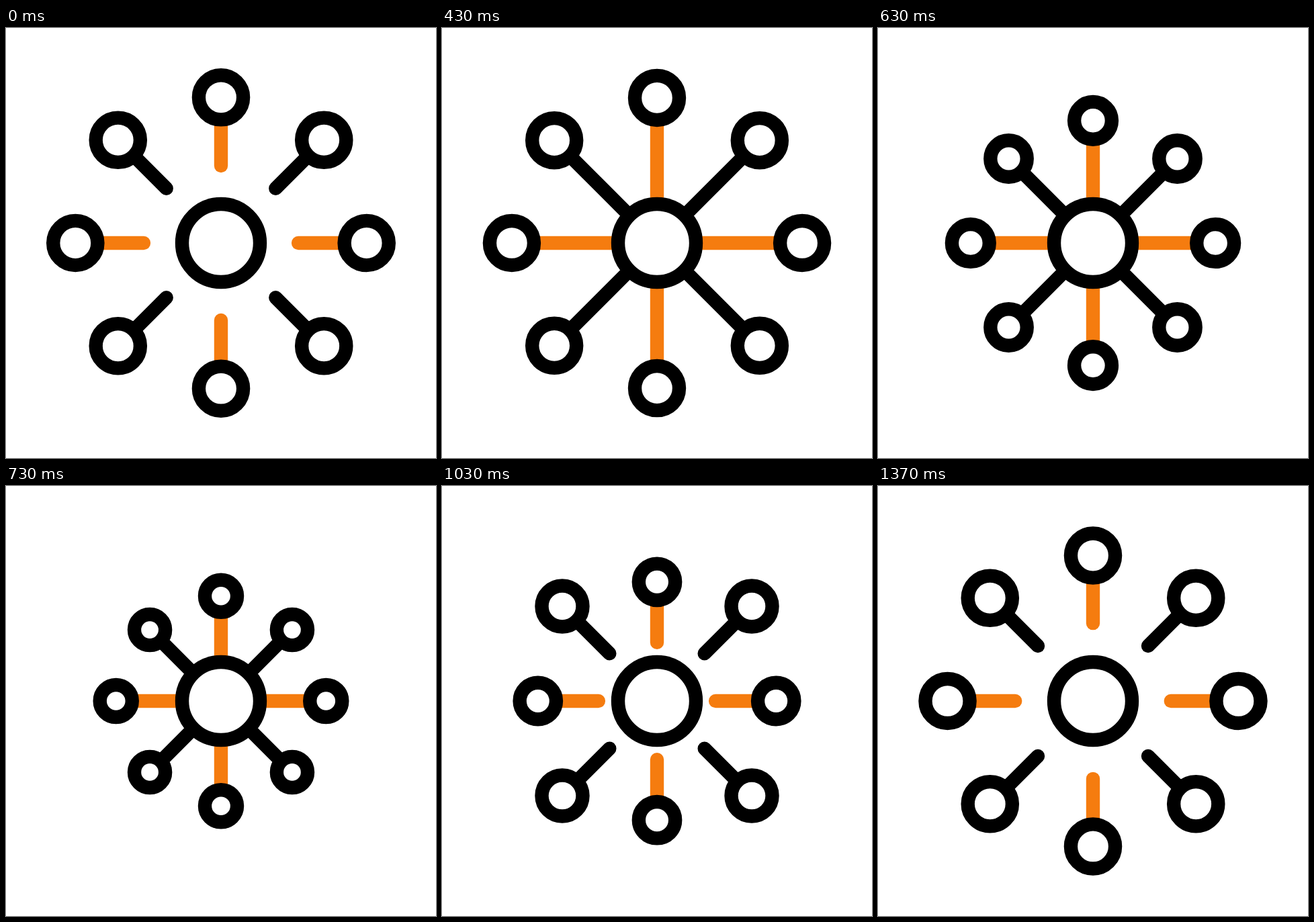
Animation of 640 by 640 pixels, one loop 1670 ms. Source, as an HTML page:

```html
<!DOCTYPE html>
<html lang="en">
<head>
<meta charset="utf-8">
<title>Hub and spokes</title>
<style>
  html, body { margin: 0; width: 100%; height: 100%; overflow: hidden; background: #fff; }
  svg { display: block; width: 100%; height: 100%; }
  circle { fill: #fff; stroke: #000; }
  line { stroke-linecap: round; }
  circle, line { stroke-width: 20.4; }
</style>
</head>
<body>
<svg viewBox="-320 -320 640 640"></svg>
<script>
const LOOP = 1670, LAST = 41;
const REACH = 216.7, NODE = 33.1, REST = 116;

// Times are in steps of 1/30 s: start moving in, turn, come to rest.
const straight = { color: '#f57c0f', go: 12.3, turn: 24.25, stop: 41.6, travel: 79.3, inner: 58 };
const diagonal = { color: '#000', go: 12.4, turn: 22.4, stop: 36.6, travel: 70, inner: 51 };

const svg = document.querySelector('svg');

function add(parent, name, attrs = {}) {
  const el = document.createElementNS('http://www.w3.org/2000/svg', name);
  for (const key in attrs) el.setAttribute(key, attrs[key]);
  return parent.appendChild(el);
}

const spokes = Array.from({ length: 8 }, (_, i) => {
  const kind = i % 2 ? diagonal : straight;
  const g = add(svg, 'g', { transform: `rotate(${i * 45})` });
  return { kind, line: add(g, 'line', { stroke: kind.color }), node: add(g, 'circle') };
});
add(svg, 'circle', { r: 58 });

function bezier(x1, y1, x2, y2) {
  const at = (a, b, s) => 3 * a * s * (1 - s) ** 2 + 3 * b * s * s * (1 - s) + s ** 3;
  return x => {
    if (x <= 0) return 0;
    if (x >= 1) return 1;
    let lo = 0, hi = 1;
    for (let i = 0; i < 24; i++) {
      const mid = (lo + hi) / 2;
      if (at(x1, x2, mid) < x) lo = mid; else hi = mid;
    }
    return at(y1, y2, lo);
  };
}

const smooth = bezier(.333, 0, .667, 1);
const speedUp = bezier(.333, 0, .833, .833);
const slowDown = bezier(.167, .167, .667, 1);
const part = (n, from, to) => (n - from) / (to - from);

function pose(n, { go, turn, stop, travel, inner }) {
  const pull = n < turn ? speedUp(part(n, go, turn)) : 1 - slowDown(part(n, turn, stop));
  const grow = n < turn ? smooth(part(n, -1, go)) : pull;
  const shift = travel * pull;
  return { x: REACH - shift, r: NODE - .15 * shift, end: REST - (REST - inner) * grow };
}

function draw(t) {
  const n = Math.min(LAST, Math.floor((Math.floor(t / 10) * 3 + 1) / 10));
  for (const { kind, line, node } of spokes) {
    const { x, r, end } = pose(n, kind);
    line.setAttribute('x1', x);
    line.setAttribute('x2', end);
    node.setAttribute('cx', x);
    node.setAttribute('r', r);
  }
}

const start = performance.now();
function tick() {
  draw((performance.now() - start) % LOOP);
  requestAnimationFrame(tick);
}
tick();
</script>
</body>
</html>
```
